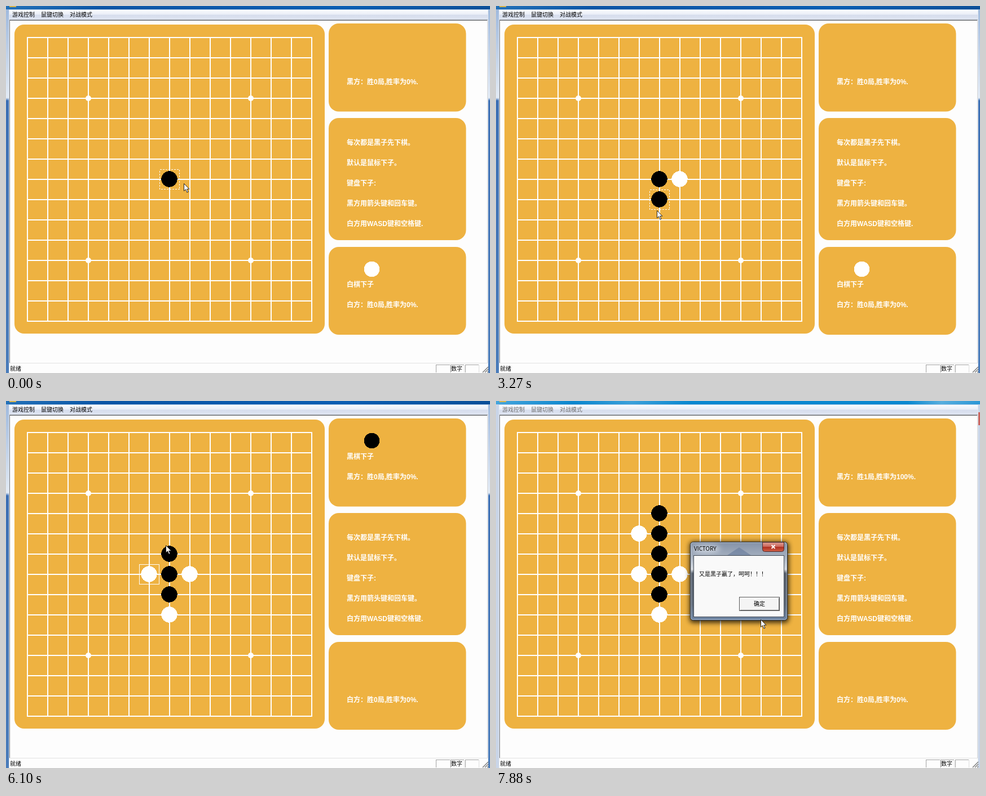
An HTML page for the animation above (8000 ms loop, 858 px wide and 652 px high).

```html
<!DOCTYPE html>
<html lang="zh-CN">
<head>
<meta charset="utf-8">
<title>五子棋</title>
<style>
  html, body { margin: 0; width: 100%; height: 100%; overflow: hidden; background: #fdfdfd; }
  svg { display: block; }
  text { font: 10px "Noto Sans CJK SC", "Noto Sans CJK", sans-serif; white-space: pre; }
  .info text { font: bold 12px "Liberation Sans", "Noto Sans CJK SC", "Noto Sans CJK", sans-serif; fill: #fff; }
  .crisp { shape-rendering: crispEdges; }
  #shadow { filter: blur(4px); }
  #glow { filter: blur(5px); }
</style>
</head>
<body>
<svg id="stage" width="858" height="652" viewBox="0 0 858 652">
  <defs>
    <linearGradient id="menuFill" x2="0" y2="1">
      <stop offset="0" stop-color="#fbfcfe"/><stop offset=".45" stop-color="#eaeef7"/>
      <stop offset=".55" stop-color="#d6dded"/><stop offset="1" stop-color="#dfe5f2"/>
    </linearGradient>
    <linearGradient id="titleFill">
      <stop offset="0" stop-color="#2371b8"/><stop offset=".2" stop-color="#0a55a5"/>
      <stop offset=".7" stop-color="#0b5eb2"/><stop offset="1" stop-color="#0a4f98"/>
    </linearGradient>
    <linearGradient id="idleTitleFill">
      <stop offset="0" stop-color="#45a5dc"/><stop offset=".16" stop-color="#0b86cd"/>
      <stop offset=".28" stop-color="#3ba0da"/><stop offset=".4" stop-color="#0a88d0"/>
      <stop offset=".85" stop-color="#0a88d0"/><stop offset=".92" stop-color="#58aede"/>
      <stop offset="1" stop-color="#2b97d6"/>
    </linearGradient>
    <linearGradient id="sideFill" x2="0" y2="1">
      <stop offset="0" stop-color="#9db8dc"/><stop offset=".1" stop-color="#b9cce6"/>
      <stop offset=".25" stop-color="#e3ebf5"/><stop offset=".258" stop-color="#3c6fb4"/>
      <stop offset="1" stop-color="#4a7cba"/>
    </linearGradient>
    <linearGradient id="glass" x2="0" y2="1">
      <stop offset="0" stop-color="#8492a8"/><stop offset=".18" stop-color="#a3aebe"/>
      <stop offset=".35" stop-color="#d3d8de"/><stop offset=".4" stop-color="#59626f"/>
      <stop offset=".8" stop-color="#626d7c"/><stop offset="1" stop-color="#7189a8"/>
    </linearGradient>
    <linearGradient id="closeFill" x2="0" y2="1">
      <stop offset="0" stop-color="#dfa199"/><stop offset=".48" stop-color="#cb6458"/>
      <stop offset=".52" stop-color="#b02f20"/><stop offset="1" stop-color="#cf6048"/>
    </linearGradient>
  </defs>

  <rect width="858" height="652" fill="#fdfdfd"/>
  <g class="crisp">
    <rect id="leftEdge" width="5" height="652"/>
    <rect id="rightEdge" x="855" width="3" height="652"/>
    <rect id="behind" x="855" y="20" width="3" height="23" fill="#c9655f"/>
    <rect id="title" width="858" height="6"/>
    <rect x="6" width="12" height="2" fill="#d8b54d"/>
    <path d="M5 6.5H855" stroke="#b9d0ea"/>
    <rect x="6" y="7" width="848" height="17" fill="url(#menuFill)"/>
    <path d="M6 24.5H854" stroke="#a4a8ae"/>
    <path d="M7 25.5H853" stroke="#66696d"/>
    <path d="M5.5 7V652M854.5 7V652" stroke="#dfe6f0"/>
    <path d="M6.5 25V634" stroke="#74777b"/>
    <path d="M853.5 25V634" stroke="#d8d8d8"/>
    <path d="M6 634.5H854" stroke="#e2e2e2"/>
    <path d="M762.5 651V637.5H787M788.5 651V637.5H812M814.5 651V637.5H838" fill="none" stroke="#a2a2a2"/>
    <path d="M787.5 638V651M812.5 638V651M838.5 638V651" stroke="#dedede"/>
  </g>
  <path d="M845 651L855 641M849 651L855 645M853 651L855 649" stroke="#777" stroke-width="1.4"/>
  <g id="menu">
    <text x="11" y="19">游戏控制</text><text x="62" y="19">鼠键切换</text><text x="113" y="19">对战模式</text>
  </g>
  <text x="7" y="648">就绪</text><text x="789" y="648">数字</text>

  <g fill="#eeb241">
    <rect x="15" y="33" width="550" height="549" rx="17"/>
    <rect x="572" y="31" width="243.5" height="156.5" rx="18"/>
    <rect x="572" y="199" width="243.5" height="217" rx="18"/>
    <rect x="572" y="428" width="243.5" height="156" rx="18"/>
  </g>
  <path id="grid" class="crisp" stroke="#fff" stroke-width="2" fill="none"/>
  <g id="stars" fill="#fff"></g>
  <g id="stones" class="crisp"></g>
  <rect id="selection" class="crisp" width="35" height="35" fill="none" stroke="#fff"/>

  <g class="info">
    <g id="blackTurn"><circle class="crisp" cx="648.5" cy="70.5" r="13.8"/><text x="604" y="103">黑棋下子</text></g>
    <text id="blackScore" x="604" y="139"></text>
    <text x="604" y="247">每次都是黑子先下棋。</text>
    <text x="604" y="283">默认是鼠标下子。</text>
    <text x="604" y="319">键盘下子:</text>
    <text x="604" y="355">黑方用箭头键和回车键。</text>
    <text x="604" y="391">白方用WASD键和空格键.</text>
    <g id="whiteTurn"><circle class="crisp" cx="648.5" cy="467.5" r="13.8" fill="#fff"/><text x="604" y="499">白棋下子</text></g>
    <text x="604" y="535">白方：胜0局,胜率为0%.</text>
  </g>

  <g id="dialog">
    <rect id="shadow" x="343" y="250" width="176" height="144" rx="6" opacity=".75"/>
    <rect x="344.5" y="250.5" width="172" height="139" rx="5" fill="url(#glass)" stroke="#20262e"/>
    <rect x="345.5" y="251.5" width="170" height="137" rx="4" fill="none" stroke="#d5dde6" stroke-opacity=".6"/>
    <path d="M410 274L431 260L452 274Z" fill="#667b9b" opacity=".6"/>
    <ellipse id="glow" cx="373" cy="263" rx="24" ry="7" fill="#d9dfe7" opacity=".8"/>
    <text x="351" y="266">VICTORY</text>
    <path d="M472.5 251V263.5Q472.5 267.5 476.5 267.5H506.5Q510.5 267.5 510.5 263.5V251Z" fill="url(#closeFill)" stroke="#512a2a"/>
    <path d="M488.5 256L494.5 262M494.5 256L488.5 262" stroke="#fff" stroke-width="2"/>
    <rect x="350.5" y="274.5" width="160" height="109" fill="#f9f9f9" stroke="#424a55"/>
    <rect id="footer" x="351" y="339" width="159" height="44" fill="#d9d9d9"/>
    <text x="360" y="311">又是黑子赢了，呵呵！！！</text>
    <g class="crisp">
      <rect x="431.5" y="348.5" width="71" height="24" fill="#f4f4f4" stroke="#555"/>
      <path d="M432.5 371V349.5H501" fill="none" stroke="#fff"/>
      <path d="M433 371.5H501.5V350" fill="none" stroke="#777"/>
    </g>
    <text x="457" y="364">确定</text>
  </g>
  <path id="cursor" d="M.5 .5V13.6L3.5 10.8L5.9 16.2L8 15.2L5.7 10.2H9.9Z" fill="#fff" stroke="#111" stroke-width=".9"/>
</svg>
<script>
const LOOP = 8000, TICK = 140, CELL = 36, WIN = 7280;
const el = id => document.getElementById(id);
const show = (id, on) => el(id).setAttribute('display', on ? 'inline' : 'none');
const gridX = col => 38 + CELL * col;
const gridY = row => 56 + CELL * row;

// Moves alternate black and white: time, column, row.
const moves = [
  [0, 7, 7], [1540, 8, 7], [2100, 7, 8], [3780, 7, 9], [4620, 7, 6],
  [5320, 6, 7], [6160, 7, 5], [6720, 6, 5], [WIN, 7, 4]
];

// Pointer stops: time, x, y.
const pointer = [
  [0, 315, 315], [420, 338, 328], [700, 334, 312], [900, 327, 314], [1540, 327, 314],
  [2100, 289, 342], [2240, 289, 342], [2520, 292, 353], [2940, 328, 358], [3360, 263, 366],
  [3640, 283, 375], [4200, 283, 375], [4620, 287, 270], [4760, 287, 270], [5180, 261, 308],
  [5320, 257, 309], [5600, 257, 309], [6160, 291, 238], [6300, 291, 238], [6720, 256, 236],
  [6860, 256, 236], [7140, 297, 204], [7280, 297, 204], [7420, 328, 308], [7840, 469, 388]
];

function circle(parent, cx, cy, r, fill) {
  const node = document.createElementNS('http://www.w3.org/2000/svg', 'circle');
  for (const [key, value] of Object.entries({ cx, cy, r, fill })) node.setAttribute(key, value);
  return el(parent).appendChild(node);
}

let lines = '';
for (let i = 0; i < 15; i++) lines += `M37 ${gridY(i)}H543M${gridX(i)} 55V561`;
el('grid').setAttribute('d', lines);
for (const row of [3, 11]) for (const col of [3, 11]) circle('stars', gridX(col), gridY(row), 5);
const stones = moves.map(([, col, row], i) =>
  circle('stones', gridX(col) - .5, gridY(row) - .5, 14.2, i % 2 ? '#fff' : '#000'));

function pointerAt(time) {
  const next = pointer.findIndex(stop => stop[0] > time);
  if (next < 0) return pointer[pointer.length - 1].slice(1);
  const [t0, x0, y0] = pointer[next - 1], [t1, x1, y1] = pointer[next];
  const p = (time - t0) / (t1 - t0);
  return [Math.round(x0 + (x1 - x0) * p), Math.round(y0 + (y1 - y0) * p)];
}

function drawWindow(active) {
  el('title').setAttribute('fill', active ? 'url(#titleFill)' : 'url(#idleTitleFill)');
  for (const id of ['leftEdge', 'rightEdge']) el(id).setAttribute('fill', active ? 'url(#sideFill)' : '#c9d5e8');
  el('menu').setAttribute('fill', active ? '#000' : '#6d6d6d');
  show('behind', !active);
}

function drawDialog(time) {
  const open = time > WIN;
  show('dialog', open);
  if (!open) return;
  const fade = time < WIN + 2 * TICK ? .83 : 1;
  const scale = .915 + .085 * fade;
  el('dialog').setAttribute('opacity', fade);
  el('dialog').setAttribute('transform', `translate(430.5 320) scale(${scale}) translate(-430.5 -320)`);
  el('footer').setAttribute('opacity', (1 - fade) * 2.4);
}

function render(ms) {
  const time = Math.floor(ms % LOOP / TICK) * TICK;
  const count = moves.filter(move => move[0] <= time).length;
  const won = time >= WIN, whiteNext = count % 2 === 1;
  stones.forEach((stone, i) => stone.setAttribute('display', i < count ? 'inline' : 'none'));

  const [, col, row] = moves[count - 1], box = el('selection');
  show('selection', !won);
  box.setAttribute('x', gridX(col) - 17.5);
  box.setAttribute('y', gridY(row) - 17.5);
  box.setAttribute('stroke-dasharray', whiteNext ? '3 2' : 'none');

  show('blackTurn', !won && !whiteNext);
  show('whiteTurn', !won && whiteNext);
  el('blackScore').textContent = won ? '黑方：胜1局,胜率为100%.' : '黑方：胜0局,胜率为0%.';
  drawWindow(time <= WIN);
  drawDialog(time);
  el('cursor').setAttribute('transform', `translate(${pointerAt(time)})`);
}

const start = performance.now();
function loop() {
  render(performance.now() - start);
  requestAnimationFrame(loop);
}
loop();
</script>
</body>
</html>
```
